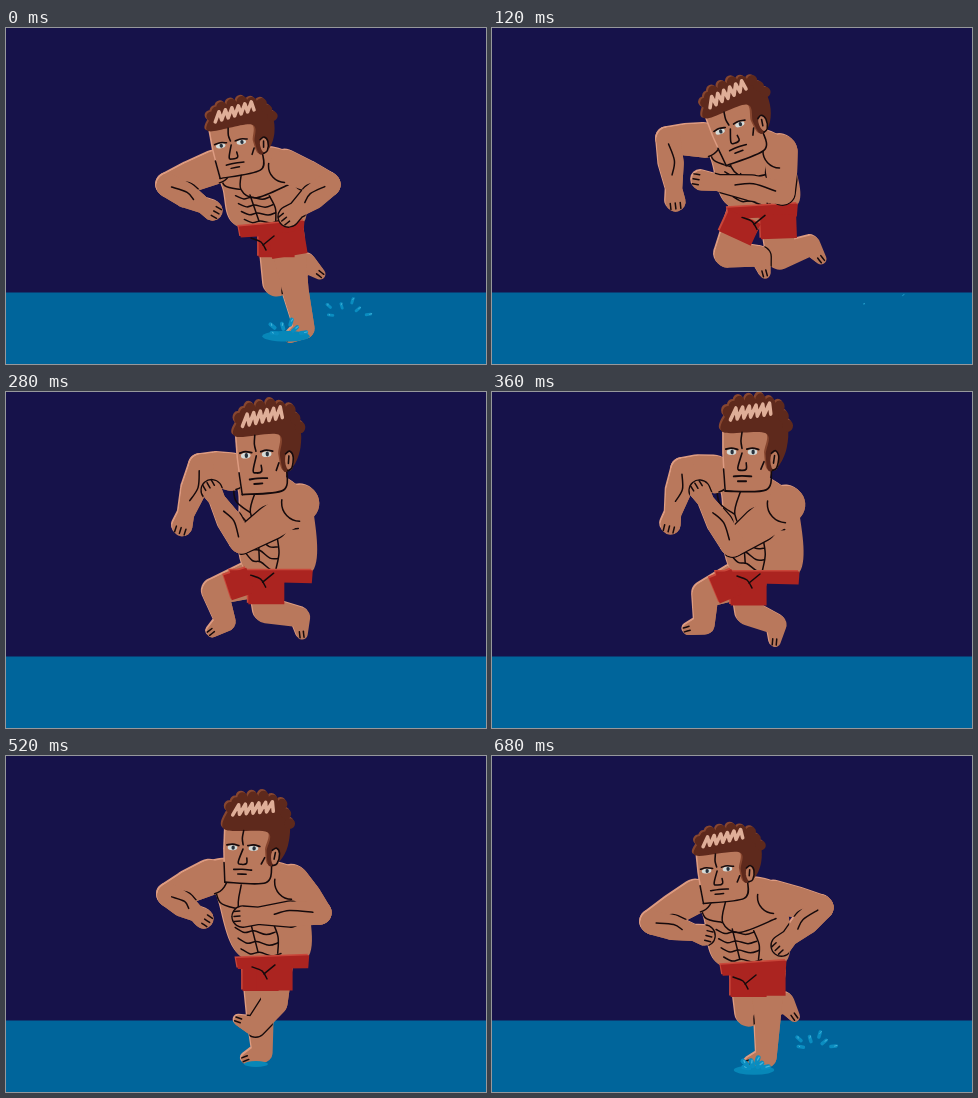
An HTML page with a canvas for the animation above (0.72 s loop, 480x336 px).

```html
<!DOCTYPE html>
<html lang="en">
<head>
<meta charset="utf-8">
<title>Running on water</title>
<style>
html, body { margin: 0; width: 100%; height: 100%; overflow: hidden; background: #16124a; }
canvas { display: block; width: 100%; height: 100%; }
</style>
</head>
<body>
<canvas id="stage" width="480" height="336"></canvas>
<script>
const ctx = document.getElementById('stage').getContext('2d');
const LOOP = 720, STEP = 40, TAU = Math.PI * 2;
const NIGHT = '#16124a', SEA = '#00659b', SKIN = '#b9785c', GLOW = '#dd9b81';
const INK = '#150a0c', RED = '#ab2420', HAIR = '#5e291c', SHINE = '#dfae98';

// Key poses of the skeleton. head: x, y, tilt; L and R as seen on screen.
const keys = [
  { t: 0, head: [225, 116, -.18], waist: [265, 195],
    shoulderL: [209, 139], elbowL: [162, 157], fistL: [206, 182],
    shoulderR: [279, 138], elbowR: [322, 156], fistR: [282, 188],
    kneeL: [289, 262], ankleL: [298, 300], kneeR: [270, 255], ankleR: [300, 235] },
  { t: 120, head: [238, 100, -.36], waist: [270, 177],
    shoulderL: [212, 112], elbowL: [176, 111], fistL: [183, 173],
    shoulderR: [288, 123], elbowR: [290, 164], fistR: [209, 152],
    kneeL: [235, 226], ankleL: [268, 228], kneeR: [287, 228], ankleR: [318, 217] },
  { t: 200, head: [248, 72, -.17], waist: [265, 178],
    shoulderL: [225, 84], elbowL: [194, 79], fistL: [176, 142],
    shoulderR: [293, 112], elbowR: [242, 148], fistR: [206, 108],
    kneeL: [212, 203], ankleL: [234, 229], kneeR: [266, 220], ankleR: [303, 222] },
  { t: 360, head: [250, 60, 0], waist: [265, 179],
    shoulderL: [222, 82], elbowL: [191, 78], fistL: [178, 132],
    shoulderR: [294, 112], elbowR: [240, 152], fistR: [207, 98],
    kneeL: [213, 202], ankleL: [212, 232], kneeR: [256, 220], ankleR: [284, 232] },
  { t: 520, head: [237, 92, .04], waist: [266, 200],
    shoulderL: [204, 121], elbowL: [163, 139], fistL: [197, 162],
    shoulderR: [286, 126], elbowR: [313, 156], fistR: [236, 160],
    kneeL: [268, 246], ankleL: [249, 270], kneeR: [254, 262], ankleR: [256, 296] },
  { t: 600, head: [230, 108, 0], waist: [256, 209],
    shoulderL: [204, 137], elbowL: [161, 163], fistL: [209, 172],
    shoulderR: [279, 141], elbowR: [332, 148], fistR: [279, 183],
    kneeL: [252, 262], ankleL: [252, 294], kneeR: [273, 262], ankleR: [293, 281] },
  { t: 680, head: [225, 114, -.1], waist: [261, 206],
    shoulderL: [204, 140], elbowL: [160, 166], fistL: [212, 179],
    shoulderR: [282, 141], elbowR: [329, 151], fistR: [289, 189],
    kneeL: [275, 262], ankleL: [274, 301], kneeR: [256, 257], ankleR: [292, 246] }
];

const mix = (a, b, k) => a + (b - a) * k;
const mixPt = (p, q, k) => [mix(p[0], q[0], k), mix(p[1], q[1], k)];
const shift = (p, x, y) => [p[0] + x, p[1] + y];
const clamp = (v, a, b) => Math.max(a, Math.min(b, v));
const polar = (p, angle, r) => shift(p, Math.cos(angle) * r, Math.sin(angle) * r);
const angleOf = (p, q) => Math.atan2(q[1] - p[1], q[0] - p[0]);

// Cyclic cubic blend between key poses.
function poseAt(t) {
  const n = keys.length, at = i => keys[(i + n) % n];
  const time = i => at(i).t + Math.floor(i / n) * LOOP;
  let i = n - 1;
  while (keys[i].t > t) i--;
  const t1 = time(i), t2 = time(i + 1), d = t2 - t1, k = (t - t1) / d;
  const k2 = k * k, k3 = k2 * k, pose = {};
  for (const name in keys[0]) {
    if (name === 't') continue;
    const [a, b, c, e] = [i - 1, i, i + 1, i + 2].map(j => at(j)[name]);
    pose[name] = b.map((p, j) => {
      const m1 = .7 * d * (c[j] - a[j]) / (t2 - time(i - 1));
      const m2 = .7 * d * (e[j] - p) / (time(i + 2) - t1);
      return p + (3 * k2 - 2 * k3) * (c[j] - p) + (k3 - 2 * k2 + k) * m1 + (k3 - k2) * m2;
    });
  }
  return pose;
}

// Smooth path through points.
function curve(pts, closed) {
  const n = pts.length, path = new Path2D();
  const at = i => closed ? pts[(i + n) % n] : pts[clamp(i, 0, n - 1)];
  path.moveTo(...pts[0]);
  for (let i = 0; i < (closed ? n : n - 1); i++) {
    const [a, b, c, d] = [at(i - 1), at(i), at(i + 1), at(i + 2)];
    path.bezierCurveTo(b[0] + (c[0] - a[0]) / 6, b[1] + (c[1] - a[1]) / 6,
      c[0] - (d[0] - b[0]) / 6, c[1] - (d[1] - b[1]) / 6, c[0], c[1]);
  }
  if (closed) path.closePath();
  return path;
}

function poly(pts) {
  const path = new Path2D();
  pts.forEach(p => path.lineTo(...p));
  path.closePath();
  return path;
}

// Tapered limb through joints [point, radius].
function tube(joints, grow = 0) {
  const path = new Path2D();
  for (let i = 0; i < joints.length - 1; i++) {
    const [[p, r], [q, s]] = [joints[i], joints[i + 1]];
    const a = angleOf(p, q), gap = Math.hypot(q[0] - p[0], q[1] - p[1]) || 1;
    const b = Math.acos(clamp((r - s) / gap, -1, 1));
    path.moveTo(...polar(p, a + b, r + grow));
    path.arc(...p, r + grow, a + b, a + TAU - b);
    path.arc(...q, s + grow, a - b, a + b);
    path.closePath();
  }
  return path;
}

function union(...paths) {
  const all = new Path2D();
  paths.forEach(p => all.addPath(p));
  return all;
}

function fillAt(path, color, offset = 0) {
  ctx.save();
  ctx.translate(offset, offset);
  ctx.fillStyle = color;
  ctx.fill(path);
  ctx.restore();
}

// Flat fill with a bright edge from the upper left.
function lit(paths, color, rim) {
  paths.forEach(p => fillAt(p, rim, -.9));
  paths.forEach(p => fillAt(p, color, .6));
}

function ink(path, width = 1.5, color = INK) {
  ctx.lineWidth = width;
  ctx.strokeStyle = color;
  ctx.stroke(path);
}

const line = (...pts) => ink(curve(pts));

// Limb laid over other skin: outlined only where it covers that area.
function overlay(joints, area) {
  ctx.save();
  ctx.clip(area);
  fillAt(tube(joints.slice(1), 1.3), INK, .6);
  ctx.restore();
  fillAt(tube(joints), SKIN, .6);
}

// Short parallel lines for fingers and toes.
function digits(p, angle, count, gap) {
  for (let i = 0; i < count; i++) {
    const base = polar(p, angle + Math.PI / 2, (i - (count - 1) / 2) * gap);
    line(polar(base, angle, 2), polar(base, angle, 8));
  }
}

function makeLeg(knee, ankle, left, right) {
  const along = clamp((knee[0] - left[0]) / (right[0] - left[0]), .25, .72);
  const hip = shift(mixPt(left, right, along), 0, 10);
  const turn = angleOf(knee, ankle) + 1.25, toe = polar(ankle, turn, 17);
  const a = angleOf(hip, knee), half = 11 + 7 * Math.abs(Math.sin(a));
  const hem = polar(hip, a, 24), side = a + Math.PI / 2;
  return {
    joints: [[hip, 18], [knee, 13], [ankle, 10], [toe, 5.5]], toe, turn,
    sleeve: poly([polar(hip, side, half), polar(hem, side, half),
      polar(hem, side, -half), polar(hip, side, -half)])
  };
}

function makeArm(shoulder, elbow, fist, big) {
  return {
    shoulder, elbow, fist, r: 16.5 * big,
    upper: [[shoulder, 16.5 * big], [mixPt(shoulder, elbow, .5), 15 * big], [elbow, 12]],
    fore: [[elbow, 12], [mixPt(elbow, fist, .38), 12.5], [mixPt(elbow, fist, .8), 8], [fist, 10]]
  };
}

function drawArm(arm, area, mirror) {
  const { shoulder, elbow, fist, r } = arm, a = angleOf(elbow, fist);
  overlay(arm.upper, area);
  overlay(arm.fore, union(area, tube(arm.upper)));
  const fold = new Path2D();
  fold.arc(...shoulder, r, ...(mirror ? [1.6, 3.3] : [-.1, 1.3]));
  ink(fold);
  const bulge = polar(mixPt(elbow, fist, .35), angleOf(elbow, shoulder), 4);
  line(mixPt(elbow, fist, .08), bulge, mixPt(elbow, fist, .58));
  digits(fist, a, 3, 5);
}

function drawChest(p, waist) {
  const { shoulderL: l, shoulderR: r } = p, mid = mixPt(l, r, .5);
  const at = (u, v) => shift(mixPt(l, r, u), v * (waist[0] - mid[0]), v * (waist[1] - mid[1]));
  line(at(.03, .08), at(.04, .33), at(.24, .4));
  line(at(.36, .08), at(.25, .4), at(.43, .55), at(.95, .33));
  for (let row = 0; row < 4; row++) {
    const v = .54 + row * .14;
    line(at(.14, v - .03), at(.24, v + .03), at(.36, v), at(.5, v + .04), at(.62, v));
  }
  line(at(.35, .5), at(.34, .96));
  line(at(.62, .52), at(.64, .74), at(.58, .96));
}

function drawHead([x, y, tilt], lift, fall) {
  const tall = 46 + 9 * fall;
  ctx.save();
  ctx.translate(x, y);
  ctx.rotate(tilt);
  ctx.scale(1.05, 1 + .22 * lift);

  const jaw = [[-18, -20], [-18, 2], [-16, 32], [23, 31], [29, 10], [25, -18]];
  lit([poly(jaw)], SKIN, GLOW);
  line([-17.5, 14], jaw[2]);
  line(jaw[2], jaw[3], [28, 14]);

  const crown = [[-14, -.68], [-3, -.85], [17, -.89], [35, -.77], [43, -.45]].map(([u, v]) => [u, v * tall]);
  const hair = curve([[-19, -17], ...crown, [42, -4], [35, 10], [25, 15], [22, 2], [22, -16]], true);
  const curls = new Path2D();
  for (let i = 0; i < 9; i++) {
    const c = mixPt(crown[i >> 1], crown[(i + 1) >> 1], .5);
    curls.moveTo(c[0] + 5, c[1]);
    curls.arc(...c, 5, 0, TAU);
  }
  lit([hair, curls], HAIR, '#87462f');

  const zig = new Path2D();
  for (let i = 0; i < 13; i++) zig.lineTo(-11 + i * 3.2 + i % 2 * 2, -.62 * tall - i * .4 + (i % 2 ? -5 : 4));
  ink(zig, 3.4, SHINE);

  const oval = (u, v, w, h, color) => {
    const path = new Path2D();
    path.ellipse(u, v, w, h, 0, 0, TAU);
    fillAt(path, color);
  };
  oval(31, 7, 4, 8, SKIN);
  line([28, 1], [32, -1], [35, 4], [33, 13], [29, 15]);
  line([31, 3], [30, 9]);
  for (const u of [-10, 10]) {
    oval(u, 0, 4.6, 2.4, '#d5dbd8');
    oval(u + .6, 0, 1.6, 2, '#27313c');
    line([u - 5.5, -2.3], [u, -3.2], [u + 6, -2]);
  }
  line([0, -16], [-1, -9], [0, -3]);
  line([0, 1], [-4, 13], [-1, 15], [4, 14], [4, 9]);
  line([-8, 20], [0, 19.5], [9, 20]);
  line([-4, 24], [4, 24]);
  line([21, 8], [18, 14]);
  ctx.restore();
}

// Ring and fan of drops that drift right, rise and shrink.
function splash(t, born, life, x, y) {
  const age = (t - born + LOOP) % LOOP, k = age / life;
  if (k > 1) return;
  const c = [x + age * .45, y - 28 * k], spread = 30 * Math.sqrt(k), left = 1 - k;
  if (k < .45) {
    const ring = new Path2D();
    ring.ellipse(c[0], c[1] + 2, 12 + spread * .6, 3 + spread * .12, 0, 0, TAU);
    fillAt(ring, '#0787b8');
  }
  for (let i = 0; i < 6 && age; i++) {
    if (k > .85 && i % 4) continue;
    const a = Math.PI * (1.04 + i * .184), far = spread * (.75 + i % 2 * .3);
    const p = shift(c, Math.cos(a) * far, Math.sin(a) * far * .75);
    const drop = curve([p, polar(p, a, -1 - left * spread * .4)]);
    ink(drop, 1 + 5 * left, '#0a8dc0');
    ink(shift === 0 ? drop : curve([shift(p, 1, -.5), polar(p, a, -left * 3)]), .5 + left, '#45b4da');
  }
}

function draw(t) {
  const p = poseAt(t);
  const lift = clamp((114 - p.head[1]) / 54, 0, 1.05);
  const fall = Math.max(0, Math.sin(TAU * (t - 320) / LOOP)) * (t > 320);
  ctx.lineCap = ctx.lineJoin = 'round';
  ctx.fillStyle = NIGHT;
  ctx.fillRect(0, 0, 480, 336);
  ctx.fillStyle = SEA;
  ctx.fillRect(0, 264.5, 480, 72);

  const { shoulderL, shoulderR, waist } = p;
  const chest = mixPt(shoulderL, shoulderR, .5);
  const tilt = (angleOf(waist, chest) + Math.PI / 2) * (1 - lift) * .25;
  const half = 33 + 9 * lift;
  const left = polar(waist, tilt, -half), right = polar(waist, tilt, half);
  const torso = curve([shift(shoulderL, 0, -14), shift(chest, 0, -20), shift(shoulderR, 0, -15),
    shift(shoulderR, 13, 10), shift(right, -2, 3), polar(right, tilt, -67), shift(shoulderL, 8, 22)], true);

  const legL = makeLeg(p.kneeL, p.ankleL, left, right);
  const legR = makeLeg(p.kneeR, p.ankleR, left, right);
  const big = 1 + .13 * lift;
  const armL = makeArm(shoulderL, p.elbowL, p.fistL, big);
  const armR = makeArm(shoulderR, p.elbowR, p.fistR, big);

  lit([tube(legR.joints), tube(legL.joints)], SKIN, GLOW);
  overlay(legL.joints, tube(legR.joints));
  for (const leg of [legR, legL]) digits(polar(leg.toe, leg.turn, -4), leg.turn, 2, 4);

  const arms = [armL, armR].flatMap(a => [tube(a.upper), tube(a.fore)]);
  lit([...arms, torso], SKIN, GLOW);
  drawChest(p, waist);

  const belt = poly([left, right, shift(right, -1, 13), shift(left, 2, 11)]);
  lit([belt, legR.sleeve, legL.sleeve], RED, '#c9473a');
  const fork = shift(waist, -5, 27 - 10 * lift);
  line(shift(fork, -15, -12), shift(fork, -5, -8), fork);
  line(shift(fork, -3, -5), shift(fork, 8, -14));

  drawArm(armL, torso, false);
  drawArm(armR, union(torso, arms[0], arms[1]), true);
  drawHead(p.head, lift, fall);
  splash(t, 520, 320, 250, 306);
  splash(t, 640, 190, 244, 318);
}

const start = performance.now();
function tick() {
  const t = (performance.now() - start) % LOOP;
  draw(Math.floor(t / STEP) * STEP);
  requestAnimationFrame(tick);
}
tick();
</script>
</body>
</html>
```
